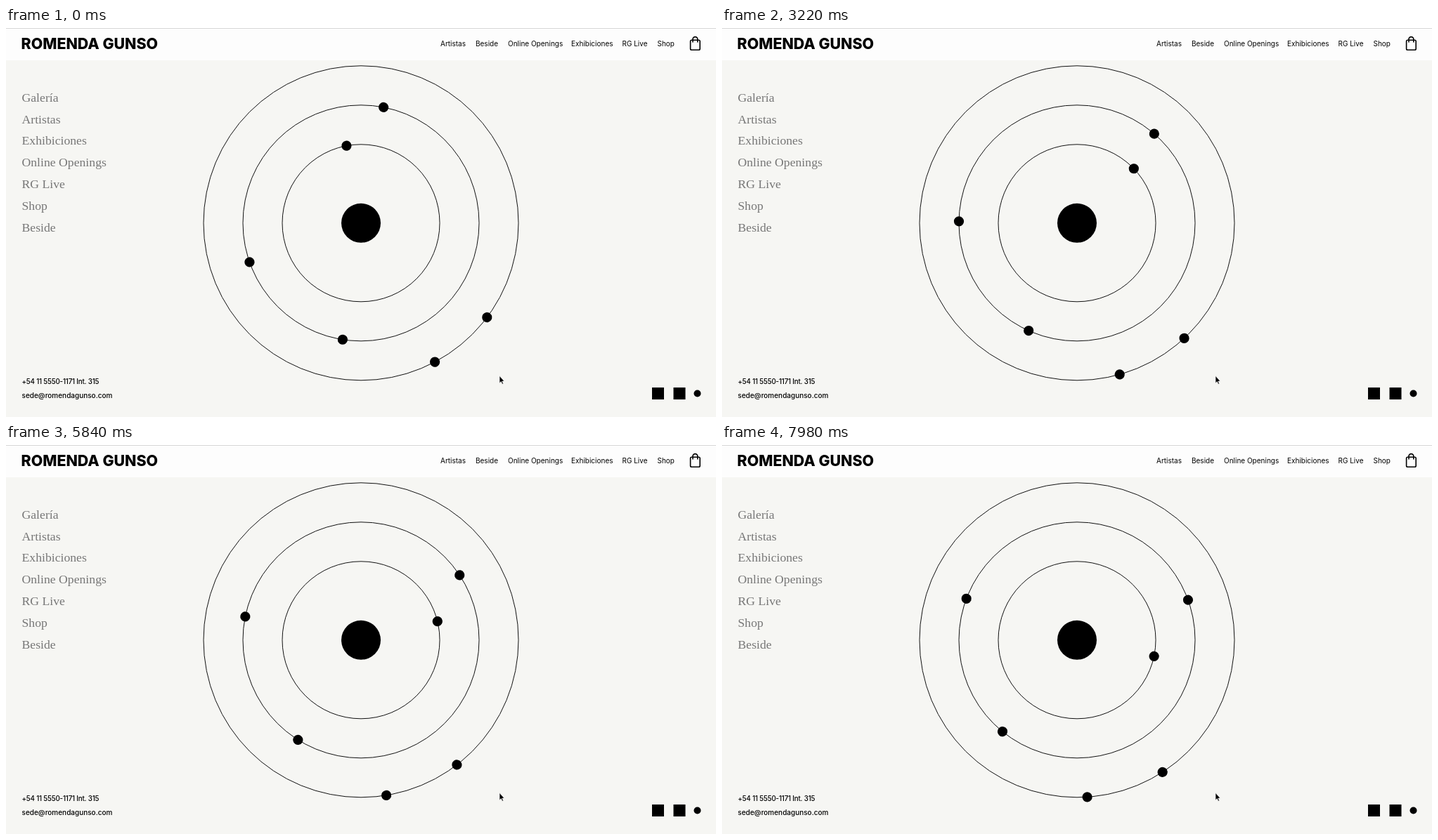
These frames come from a looping animation (1010 by 554 pixels, 8000 ms). An HTML page:

```html
<!DOCTYPE html>
<html lang="es">
<head>
<meta charset="utf-8">
<title>Romenda Gunso</title>
<style>
  html, body { margin: 0; width: 100%; height: 100%; overflow: hidden; background: #f6f6f3; }
  svg { display: block; width: 1010px; height: 554px; }
  text { font: 500 10px Inter, Roboto, sans-serif; }
  .brand { font-weight: 800; font-size: 21.4px; }
  .nav text { font-weight: 400; }
  .menu text { font: 17.7px "Liberation Serif", "Noto Serif", serif; fill: #777; }
  .phone { font-size: 9.8px; letter-spacing: -.2px; }
  .rings { fill: none; stroke: #111; stroke-width: 1; }
</style>
</head>
<body>
<svg viewBox="0 0 1010 554">
  <rect width="1010" height="554" fill="#f6f6f3"/>
  <rect width="1010" height="46" fill="#fdfdfd"/>
  <rect width="1010" height="1" fill="#d6d6d6"/>

  <text class="brand" x="21.5" y="29.7">ROMENDA GUNSO</text>
  <g id="nav" class="nav"></g>
  <g fill="none" stroke="#000" stroke-width="1.6">
    <rect x="973.6" y="17.2" width="13.6" height="14" rx="1.8"/>
    <path d="M977 20.5V16a3.4 3.4 0 0 1 6.8 0v4.5"/>
  </g>

  <g id="menu" class="menu"></g>

  <g id="orbits" transform="translate(505 277.8)">
    <g class="rings"><circle r="112"/><circle r="168"/><circle r="224"/></g>
    <circle r="28"/>
  </g>

  <text class="phone" x="22.5" y="506.5">+54 11 5550-1171 Int. 315</text>
  <text x="22.5" y="526.5">sede@romendagunso.com</text>

  <rect x="919" y="512" width="17" height="17"/>
  <rect x="949.5" y="512" width="17" height="17"/>
  <circle cx="983.5" cy="520.5" r="5"/>

  <path d="M702 495.5v10.2l2.3-2.1 1.6 3.6 1.6-.7-1.6-3.5h3z" stroke="#fff" stroke-width=".6"/>
</svg>
<script>
  const LOOP = 8000;
  const byId = id => document.getElementById(id);

  function add(parent, tag, attrs, label = '') {
    const el = document.createElementNS('http://www.w3.org/2000/svg', tag);
    for (const key in attrs) el.setAttribute(key, attrs[key]);
    el.textContent = label;
    return parent.appendChild(el);
  }

  [['Artistas', 618], ['Beside', 668], ['Online Openings', 714],
   ['Exhibiciones', 804], ['RG Live', 876.5], ['Shop', 926.5]]
    .forEach(([label, x]) => add(byId('nav'), 'text', { x, y: 26 }, label));

  ['Galería', 'Artistas', 'Exhibiciones', 'Online Openings', 'RG Live', 'Shop', 'Beside']
    .forEach((label, i) => add(byId('menu'), 'text', { x: 22.5, y: 104.7 + 30.87 * i }, label));

  // Orbit radius, start angle clockwise from the top, degrees per tick
  const dots = [
    [112, -10.6, .546],
    [168, 11, .2868],
    [168, 250.7, .1935],
    [168, 188.93, .1466],
    [224, 126.84, .0984],
    [224, 152.03, .1177]
  ].map(([radius, start, rate]) =>
    ({ start, rate, el: add(byId('orbits'), 'circle', { cy: -radius, r: 7.1 }) }));

  // Motion comes in quick groups of three ticks, then a short hold
  const ticks = [20, 40, 140, 160, 180, 280, 300, 320, 420, 440,
                 970, 990, 1010, 1100, 1120, 1140, 1240, 1260];
  const addGroups = (from, to) => {
    for (let t = from; t < to; t += 140) ticks.push(t, t + 20, t + 40);
  };
  addGroups(1340, 2600);
  ticks.push(2600);
  addGroups(2620, LOOP);

  // Two longer holds are followed by a leap ahead
  function ticksAt(time) {
    const count = ticks.filter(t => t <= time).length;
    return count + (time >= 970 ? 38 : 0) + (time >= 1340 ? 5 : 0);
  }

  const origin = performance.now();
  function draw(now) {
    const n = ticksAt(Math.max(0, now - origin) % LOOP);
    for (const { el, start, rate } of dots)
      el.setAttribute('transform', `rotate(${start + rate * n})`);
    requestAnimationFrame(draw);
  }
  draw(origin);
</script>
</body>
</html>
```
